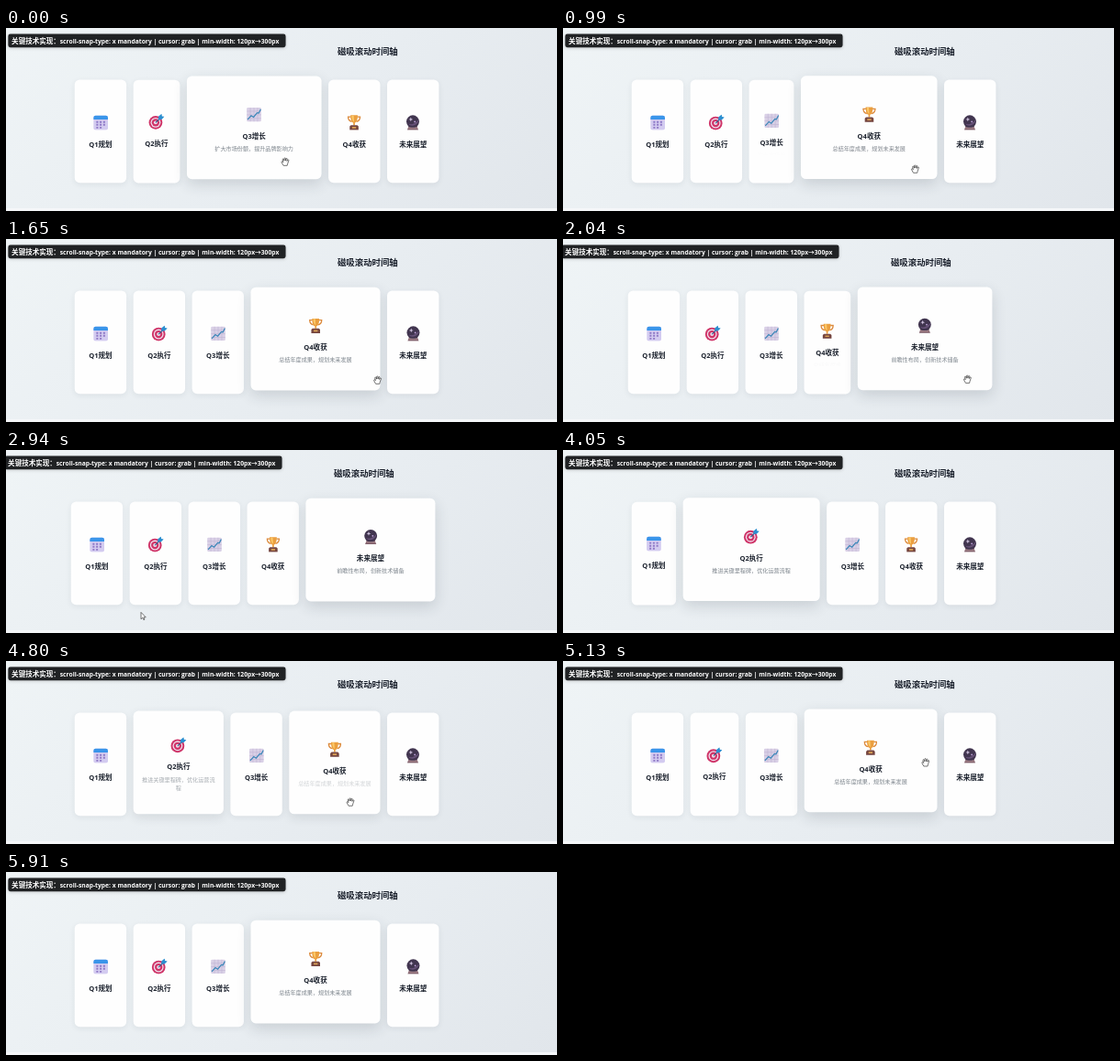
Animation, 600 px wide and 200 px high, one loop 5940 ms. Source, as an HTML page:

```html
<!DOCTYPE html>
<html>
<head>
<meta charset="utf-8">
<style>
html, body { margin: 0; width: 100%; height: 100%; overflow: hidden; }
body {
  position: relative;
  background: linear-gradient(135deg, #eff4f6, #e8edf1 55%, #e1e6eb);
  font-family: "Open Sans", "Noto Sans CJK SC", "Noto Sans CJK", sans-serif;
  color: #1a202c;
}
#strip { position: absolute; left: 0; top: 197px; width: 100%; height: 3px; background: #f5f7f9; }
#page {
  position: absolute; left: 0; top: 0; width: 1277px; height: 426px;
  transform: scale(.47); transform-origin: 0 0;
}
#note {
  position: absolute; left: 5px; top: 14px; width: 635px; height: 31px; line-height: 33px;
  padding-left: 8px; border-radius: 5px; background: #202224; color: #fff;
  font-size: 16px; font-weight: 700; white-space: nowrap;
  box-shadow: 0 2px 8px rgba(0, 0, 0, .2);
}
#note span { font-size: 14.3px; }
h1 { position: absolute; left: 768px; top: 40px; margin: 0; font-size: 20px; line-height: 30px; font-weight: 700; white-space: nowrap; }
#line { position: absolute; left: 159px; top: 120px; display: flex; gap: 16px; }
.card {
  box-sizing: border-box; flex: none; width: 120px; height: 240px; padding: 8px 18px 0;
  border-radius: 12px; background: #fefefe; overflow: hidden;
  display: flex; flex-direction: column; align-items: center; justify-content: center;
}
.card svg { flex: none; width: 37px; height: 37px; margin: 2px 0 20px; }
.card b { flex: none; margin-bottom: 8px; font-size: 16px; line-height: 24px; white-space: nowrap; }
.card p { flex: none; width: 100%; margin: 0; overflow: hidden; font-size: 13px; line-height: 19.5px; text-align: center; color: #7b838b; }
#pointer { position: absolute; left: 0; top: 0; width: 600px; height: 200px; }
#pointer path { fill: #fff; stroke: #333; stroke-width: .75; stroke-linejoin: round; }
</style>
</head>
<body>
<div id="strip"></div>
<div id="page">
  <div id="note">关键技术实现：<span>scroll-snap-type: x mandatory | cursor: grab | min-width: 120px→300px</span></div>
  <h1>磁吸滚动时间轴</h1>
  <div id="line">
    <div class="card">
      <svg viewBox="0 0 40 40">
        <rect x="2" y="3" width="36" height="36" rx="5" fill="#d3cbf0"/>
        <path d="M2 13V8a5 5 0 0 1 5-5h26a5 5 0 0 1 5 5v5z" fill="#3a95ea"/>
        <path d="M9 19h22M9 26h22M9 33h15" stroke="#8f78c6" stroke-width="4.2" stroke-dasharray="4.6 4"/>
      </svg>
      <b>Q1规划</b><p>制定年度战略目标，启动核心项目</p>
    </div>
    <div class="card">
      <svg viewBox="0 0 40 40">
        <circle cx="18" cy="22" r="17" fill="#cf3468"/>
        <circle cx="18" cy="22" r="12.5" fill="#efdcea"/>
        <circle cx="18" cy="22" r="9.5" fill="#cf3468"/>
        <circle cx="18" cy="22" r="4.5" fill="#efdcea"/>
        <path d="M18 22L32 8" stroke="#27608f" stroke-width="2.5"/>
        <path d="M25 14V7l8-7 1 6 6 1-7 7z" fill="#2b8fd0"/>
      </svg>
      <b>Q2执行</b><p>推进关键里程碑，优化运营流程</p>
    </div>
    <div class="card">
      <svg viewBox="0 0 40 40">
        <rect x="2" y="3" width="36" height="35" rx="3" fill="#d9d0e6"/>
        <path d="M11 3v35M20 3v35M29 3v35M2 12h36M2 21h36M2 30h36" stroke="#bfb2d2" stroke-width="1.3"/>
        <path d="M4 33l9-10 6 4 9-11 4 1 5-10" fill="none" stroke="#3a86b8" stroke-width="2.8"/>
      </svg>
      <b>Q3增长</b><p>扩大市场份额，提升品牌影响力</p>
    </div>
    <div class="card">
      <svg viewBox="0 0 40 40">
        <path d="M12 6H5c0 8 4 11 9 12M28 6h7c0 8-4 11-9 12" fill="none" stroke="#dc8a3c" stroke-width="3"/>
        <path d="M11 2h18c0 11-2 18-7 19v6h-4v-6c-5-1-7-8-7-19z" fill="#eb9f3f"/>
        <path d="M14 3h5l1 16c-4-2-6-7-6-16z" fill="#fbc968"/>
        <path d="M9 39v-9l3-3h16l3 3v9z" fill="#75453f"/>
        <path d="M15 31h10v4H15z" fill="#d9a055"/>
      </svg>
      <b>Q4收获</b><p>总结年度成果，规划未来发展</p>
    </div>
    <div class="card">
      <svg viewBox="0 0 40 40">
        <path d="M6 39l4-10h20l4 10z" fill="#82616c"/>
        <circle cx="20" cy="18" r="16" fill="#41354f"/>
        <path d="M8 23c8 4 16 2 26-9a15 15 0 0 1-26 9z" fill="#675279"/>
        <path d="M15 7l1.5 4 4 1.5-4 1.5-1.5 4-1.5-4-4-1.5 4-1.5z" fill="#cfc2df"/>
        <circle cx="25" cy="18" r="2" fill="#c6a9e2"/>
        <path d="M9 34h22" stroke="#b8969b" stroke-width="2"/>
      </svg>
      <b>未来展望</b><p>前瞻性布局，创新技术储备</p>
    </div>
  </div>
</div>
<svg id="pointer" viewBox="0 0 600 200">
  <path id="hand" d="M-2.2 4.8L-4.3 1C-4.8-.3-3.6-.8-2.9.2L-2.4.8-3.2-2.4C-3.2-3.6-2.1-3.6-1.7-2.6L-1.2-1-1.1-3.8C-1-4.9.3-4.9.4-3.8L.5-1.1 1.2-3.4C1.6-4.4 2.7-4 2.5-2.9L2.1-.6 3-1.9C3.7-2.8 4.6-2.1 4.2-1.1L3 2.4 2.4 4.8Z"/>
  <path id="arrow" d="M-2-4V4.2L-.1 2.4 1.2 5.2 2.4 4.6 1.2 2H3.8Z"/>
</svg>
<script>
const LOOP = 5940, MOVE = 500;
// [time, index of the card that opens]
const steps = [[-360, 2], [740, 3], [1815, 4], [3040, 0], [3750, 1], [4736, 3]];
// [time, x, y] of the pointer
const path = [
  [0, 304, 146], [500, 325, 150], [740, 352, 154], [990, 383.5, 154], [1500, 395, 154],
  [1815, 415, 154], [2040, 440.5, 153], [2250, 425, 172], [2400, 400, 181], [2960, 140, 181],
  [3040, 120, 162], [3200, 150, 176], [3360, 206, 196], [3650, 245, 186], [3750, 245, 162],
  [3990, 240, 150], [4120, 245, 165], [4250, 262, 182], [4600, 345, 182], [4735, 365, 163],
  [4800, 375, 154], [5000, 385, 150], [5200, 400, 90], [5400, 415, 20]
];

const $ = id => document.getElementById(id);
const clamp = v => Math.min(1, Math.max(0, v));
const mix = (a, b, k) => a + (b - a) * k;

function bezier(x1, y1, x2, y2) {
  const at = (a, b, s) => 3 * (1 - s) * (1 - s) * s * a + 3 * (1 - s) * s * s * b + s * s * s;
  return x => {
    if (x <= 0 || x >= 1) return clamp(x);
    let lo = 0, hi = 1;
    for (let i = 0; i < 24; i++) {
      const s = (lo + hi) / 2;
      if (at(x1, x2, s) < x) lo = s; else hi = s;
    }
    return at(y1, y2, lo);
  };
}
const spring = bezier(.34, 1.56, .64, 1);
const ease = bezier(.25, .1, .25, 1);

const cards = [...document.querySelectorAll(".card")].map(box => ({ box, text: box.querySelector("p") }));

function pose({ box, text }, open, room, alpha) {
  const lift = clamp(open);
  box.style.width = mix(120, 300, open) + "px";
  box.style.transform = `translateY(${-8 * open}px)`;
  box.style.boxShadow =
    `0 ${mix(4, 12, lift)}px ${mix(14, 32, lift)}px rgba(40,50,60,${mix(.08, .16, lift)})`;
  text.style.maxHeight = 46 * room + "px";
  text.style.opacity = alpha;
}

function movePointer(t) {
  const shown = t < 5390 && !(t > 3990 && t < 4120);
  const i = Math.max(1, path.findIndex(p => p[0] > t));
  const [t0, x0, y0] = path[i - 1], [t1, x1, y1] = path[i];
  const k = clamp((t - t0) / (t1 - t0));
  const x = mix(x0, x1, k), y = mix(y0, y1, k);
  const onCard = y > 52 && y < 167;
  for (const [id, on] of [["hand", onCard], ["arrow", !onCard]]) {
    $(id).style.display = shown && on ? "" : "none";
    $(id).setAttribute("transform", `translate(${x} ${y}) scale(.9)`);
  }
}

function draw(t) {
  const n = steps.filter(s => s[0] <= t).length - 1;
  const [start, now] = steps[n];
  const last = n ? steps[n - 1][1] : 1;
  const age = t - start;
  const grow = spring(age / MOVE), fade = ease(age / 300);
  cards.forEach((card, i) => {
    if (i === now) pose(card, grow, ease(age / 130), fade);
    else if (i === last) pose(card, 1 - grow, 1 - ease(age / MOVE), 1 - fade);
    else pose(card, 0, 0, 0);
  });
  // the page is narrower while the last card is open
  $("page").style.left = now === 4 ? "-4px" : "0";
  movePointer(t);
}

const begin = performance.now();
function tick() {
  draw((performance.now() - begin) % LOOP);
  requestAnimationFrame(tick);
}
tick();
</script>
</body>
</html>
```
